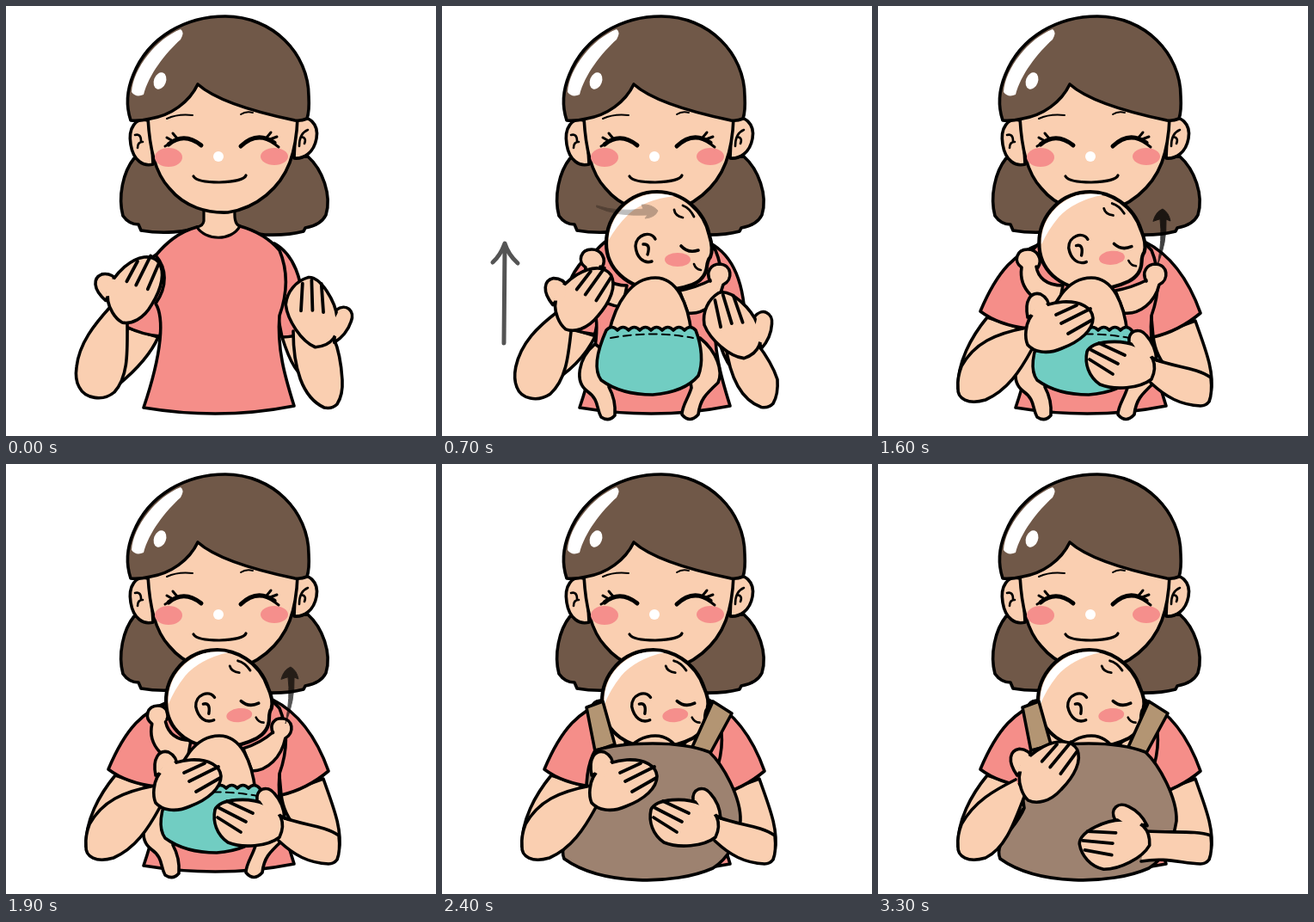
Write an HTML page with a canvas that moves like this. It is 500 by 500 pixels and loops after 4 s.

```html
<!DOCTYPE html>
<html lang="en">
<head>
<meta charset="utf-8">
<style>
  html, body { margin: 0; width: 100%; height: 100%; overflow: hidden; background: #fff; }
  canvas { display: block; }
</style>
</head>
<body>
<canvas id="stage" width="500" height="500"></canvas>
<script>
const HAIR = '#705848', SKIN = '#facfb1', SHIRT = '#f58e89', CHEEK = '#f58f8c',
      TEAL = '#71cdc2', CARRIER = '#9d8270', STRAP = '#b39573', INK = '#000';
const stage = document.getElementById('stage').getContext('2d');
const layer = document.createElement('canvas');
layer.width = layer.height = 500;
const layerCtx = layer.getContext('2d');
let g = stage;

function shape(d, fill, width = 3.6) {
  const path = new Path2D(d);
  if (fill) { g.fillStyle = fill; g.fill(path); }
  if (width) {
    g.lineWidth = width;
    g.lineCap = g.lineJoin = 'round';
    g.strokeStyle = INK;
    g.stroke(path);
  }
}
const line = (d, width) => shape(d, null, width);

function oval(x, y, rx, ry, fill, tilt = 0) {
  g.beginPath();
  g.ellipse(x, y, rx, ry, tilt, 0, 7);
  g.fillStyle = fill;
  g.fill();
}

const mix = (a, b, t) => a + (b - a) * t;

// Blend two paths that share the same commands.
function morph(from, to, t) {
  const ends = to.match(/\d+/g);
  let i = 0;
  return from.replace(/\d+/g, n => mix(+n, +ends[i++], t).toFixed(2));
}

// Draw around a pivot that is shifted and turned (degrees).
function turned(x, y, [dx, dy, angle], draw) {
  g.save();
  g.translate(x + dx, y + dy);
  g.rotate(angle * Math.PI / 180);
  g.translate(-x, -y);
  draw();
  g.restore();
}

function faded(alpha, draw) {
  if (alpha <= 0) return;
  if (alpha >= 1) return draw();
  g = layerCtx;
  g.clearRect(0, 0, 500, 500);
  draw();
  g = stage;
  g.globalAlpha = alpha;
  g.drawImage(layer, 0, 0);
  g.globalAlpha = 1;
}

function backHair() {
  shape('M149 177C136 193 130 222 136 244Q143 254 154 254L157 261C180 265 210 264 230 255L270 255Q285 265 301 266Q328 267 346 262L348 258Q366 255 372 243C379 220 368 190 351 175Z', HAIR);
}

function torso() {
  shape('M222 257C200 263 186 276 174 290C187 305 188 326 174 346C184 362 182 402 160 467Q250 482 335 465C324 430 315 398 318 360C327 335 328 308 318 284C306 270 290 261 272 256Z', SHIRT);
  shape('M230 235L230 250Q229 256 222 257C232 273 262 274 272 256Q265 254 266 248L267 235Z', SKIN, 0);
  line('M230 238L230 250Q229 256 222 257C232 273 262 274 272 256Q265 254 266 238', 3.2);
}

function face() {
  shape('M168 134C150 127 142 143 145 161C148 180 160 187 171 184Z', SKIN);
  shape('M337 133C352 124 364 138 361 154C358 171 346 178 335 177Z', SKIN);
  line('M150 150Q157 148 157 157M153 165Q153 158 159 158', 2.6);
  line('M351 144Q341 148 341 163M343 152Q350 153 347 160', 2.6);
  shape('M165 130C167 165 173 194 190 212C208 234 234 241 258 240C292 235 319 211 330 182Q338 160 339 130L223 85Z', SKIN);
  shape('M145 133C138 112 143 92 148 80C166 35 210 12 255 12C310 12 352 55 352 105Q353 122 350 131Q343 134 336 133C288 123 243 109 223 91C213 112 192 127 168 131Q155 134 145 133Z', HAIR);
  shape('M203 27C175 38 148 72 146 100Q151 107 160 103C166 80 185 55 203 39Q208 30 203 27Z', '#fff', 0);
  oval(179, 87, 7, 10, '#fff', .35);
  line('M187 131Q200 125 217 127M273 126Q279 122 287 124', 2);
  oval(189, 176, 16, 11, CHEEK);
  oval(312, 175, 16, 10, CHEEK);
  oval(247, 175, 6, 6, '#fff');
  line('M189 161Q207 146 227 162M273 163Q292 145 312 159', 5);
  line('M191 160L185 163M194 157L187 153M199 154L194 148M309 158L317 164M307 155L315 152M303 153L308 147', 3);
  line('M218 198Q222 205 248 205Q276 204 279 197', 3.2);
}

// Each limb is a pair of paths: hands raised, then hugging.
const upperArms = [
  ['M141 374C139 395 135 420 131 440Q165 412 177 385Z',
   'M127 362C108 385 92 415 93 445Q150 440 182 380Z'],
  ['M338 381C342 400 346 415 350 432Q335 430 321 385Z',
   'M369 366C379 395 392 425 387 450Q325 432 320 384Z']
];
const sleeves = [
  ['M178 287C160 296 148 315 140 373Q158 382 179 384L190 320Z',
   'M190 276C160 288 140 305 119 355Q140 371 174 375L190 330Z'],
  ['M312 276C330 286 350 312 345 380Q335 385 321 385L310 330Z',
   'M310 274C338 288 360 315 375 357Q350 378 320 385L315 330Z']
];
// Forearms add a third pose: patting the carrier.
const leftForearm = [
  'M122 349C103 370 85 392 82 420Q80 434 85 443C92 457 113 460 126 449C143 430 141 400 141 366',
  'M173 374C136 381 112 392 97 419Q92 432 93 444C92 457 105 464 125 458C150 447 165 425 179 399',
  'M160 367C136 379 112 392 97 419Q92 432 93 444C92 457 105 464 125 458C148 447 158 418 170 387'
];
const rightForearm = [
  'M381 386C388 402 390 418 391 435Q392 452 385 463C380 468 375 468 370 467C344 455 334 420 334 378',
  'M322 411C345 420 370 420 387 432Q389 450 385 460C382 464 378 465 375 465C352 464 335 455 317 438',
  'M312 427C345 429 370 426 387 432Q389 450 385 460C382 464 378 465 375 465C352 464 335 457 306 462'
];
// Hand offsets and angles for the three poses.
const leftHandPoses = [[-59, -44, -37], [0, 0, 0], [-11, -16, -24]];
const rightHandPoses = [[75, -60, 61], [0, 0, 0], [-6, 24, -22]];

function arms(pose) {
  const k = Math.min(1, Math.floor(pose)), t = pose - k;
  const limb = poses => shape(morph(poses[k], poses[k + 1], t), SKIN);
  const offset = poses => poses[k].map((v, i) => mix(v, poses[k + 1][i], t));
  limb(leftForearm);
  limb(rightForearm);
  turned(211, 373, offset(leftHandPoses), leftHand);
  turned(282, 417, offset(rightHandPoses), rightHand);
}

function leftHand() {
  shape('M174 362C170 342 178 332 189 335Q199 340 199 352Z', SKIN);
  shape('M172 378C174 356 190 346 215 344C236 343 249 351 250 363C250 377 235 390 214 398C196 406 181 402 174 394Q171 387 172 378Z', SKIN);
  shape('M177 358L192 342L198 350L188 364Z', SKIN, 0);
  line('M231 348L207 359M247 352L213 369M249 365L221 381', 3.8);
}

function rightHand() {
  shape('M292 392C290 377 304 373 312 383Q323 395 324 412Z', SKIN);
  shape('M243 402C249 388 284 388 300 395C320 402 326 417 318 434C304 445 275 447 258 440C245 431 240 416 243 402Z', SKIN);
  shape('M294 389L309 386L320 406L309 412Z', SKIN, 0);
  line('M257 392L287 406M248 400L279 416M246 411L273 428', 3.8);
}

function babyHead() {
  shape('M250 216C280 216 305 238 311 267Q316 283 312 292Q309 295 308 303Q306 318 291 324Q272 331 250 330C215 328 191 305 191 276C191 242 218 216 250 216Z', SKIN, 4.2);
  shape('M270 221Q254 217 240 219C212 226 195 248 194 272Q202 257 217 242Q236 225 270 221Z', '#fff', 0);
  line('M248 271C243 261 226 265 225 279C226 292 234 300 244 297M234 277Q243 276 239 289', 3.4);
  oval(274, 295, 15, 8, CHEEK);
  line('M278 279Q286 288 298 284', 3.6);
  line('M293 300Q295 306 301 307', 2.6);
  line('M280 232Q288 235 293 245M270 237Q271 244 280 246', 2.8);
}

// Baby arms: stretched out, then tucked in.
const babyArms = [
  ['M186 304C192 294 185 283 174 283C161 283 157 297 167 304C163 330 185 348 210 350L215 325C195 325 186 315 184 303',
   'M190 276C188 275 186 275 184 275C172 276 171 290 178 297C168 320 185 345 210 348L215 310C200 310 195 300 190 290'],
  ['M312 320C306 309 313 300 323 300C337 301 339 318 327 324C322 345 304 359 286 357L276 331C292 328 304 323 312 319',
   'M306 290C306 286 307 284 310 283C326 282 326 296 318 304C315 330 303 350 286 357L275 330C290 320 300 305 306 290']
];

function baby(turn, tuck, legs) {
  for (const [out, tucked] of babyArms) shape(morph(out, tucked, tuck), SKIN);
  turned(251, 275, [-5 * turn, 0, -7 * turn], babyHead);
  if (legs) {
    shape('M178 393C158 410 154 437 169 448C183 458 179 467 185 478Q194 484 201 476C202 463 199 452 194 443L200 410Z', SKIN);
    shape('M300 386C320 402 327 425 321 438C306 452 300 458 298 475Q288 486 279 475C279 465 286 457 290 444L285 410Z', SKIN);
  }
  shape('M194 380C202 345 220 316 248 316C274 316 286 347 290 380Z', SKIN);
  if (legs) {
    shape('M191 377' + 'q6.5 -7 13 0'.repeat(8) + 'C302 395 304 415 298 430Q282 449 245 452Q208 452 185 435C174 420 183 395 191 377Z', TEAL);
    g.setLineDash([9, 6]);
    line('M196 386Q245 377 292 386', 2);
    g.setLineDash([]);
  }
}

function carrierPanel() {
  shape('M168 283L187 276L201 326L178 334Z', STRAP);
  shape('M315 276L337 290L311 338L291 329Z', STRAP);
  shape('M178 333Q205 325 245 325Q285 325 311 335C327 350 348 388 347 415C344 435 335 457 315 470C270 490 185 490 142 459C134 440 160 425 170 400C165 372 170 347 178 333Z', CARRIER);
}

const upArrow = () => line('M72 392L73 280M59 298Q68 290 73 276Q77 289 88 299', 5);
const headArrow = () => shape('M180 232Q204 240 234 236L232 231Q244 230 251 238Q248 246 236 247L239 243Q203 245 180 234Z', INK, 1);
const sideArrow = () => shape('M320 250Q323 239 331 236Q338 240 340 250L335 248Q336 275 325 302Q331 270 328 248Z', INK, 1);

function render(time) {
  // Progress from 0 to 1 in equal steps of 100 ms.
  const ramp = (start, steps) =>
    Math.max(0, Math.min(steps, Math.floor((time - start) / 100) + 1)) / steps;
  const hug = ramp(700, 4), turn = ramp(1400, 4), carrier = ramp(2300, 2);

  g.fillStyle = '#fff';
  g.fillRect(0, 0, 500, 500);
  backHair();
  for (const [raised, hugging] of upperArms) shape(morph(raised, hugging, hug), SKIN);
  for (const [raised, hugging] of sleeves) shape(morph(raised, hugging, hug), SHIRT);
  torso();
  face();
  faded(ramp(200, 2), () => baby(turn, ramp(1900, 4), carrier < 1));
  faded(carrier, carrierPanel);
  arms(hug + ramp(3100, 3));
  faded(ramp(200, 2) - ramp(700, 3), upArrow);
  faded(hug - ramp(1400, 3), headArrow);
  faded(turn - ramp(1900, 3), sideArrow);
}

function tick() {
  render(performance.now() % 4000);
  requestAnimationFrame(tick);
}
tick();
</script>
</body>
</html>
```
